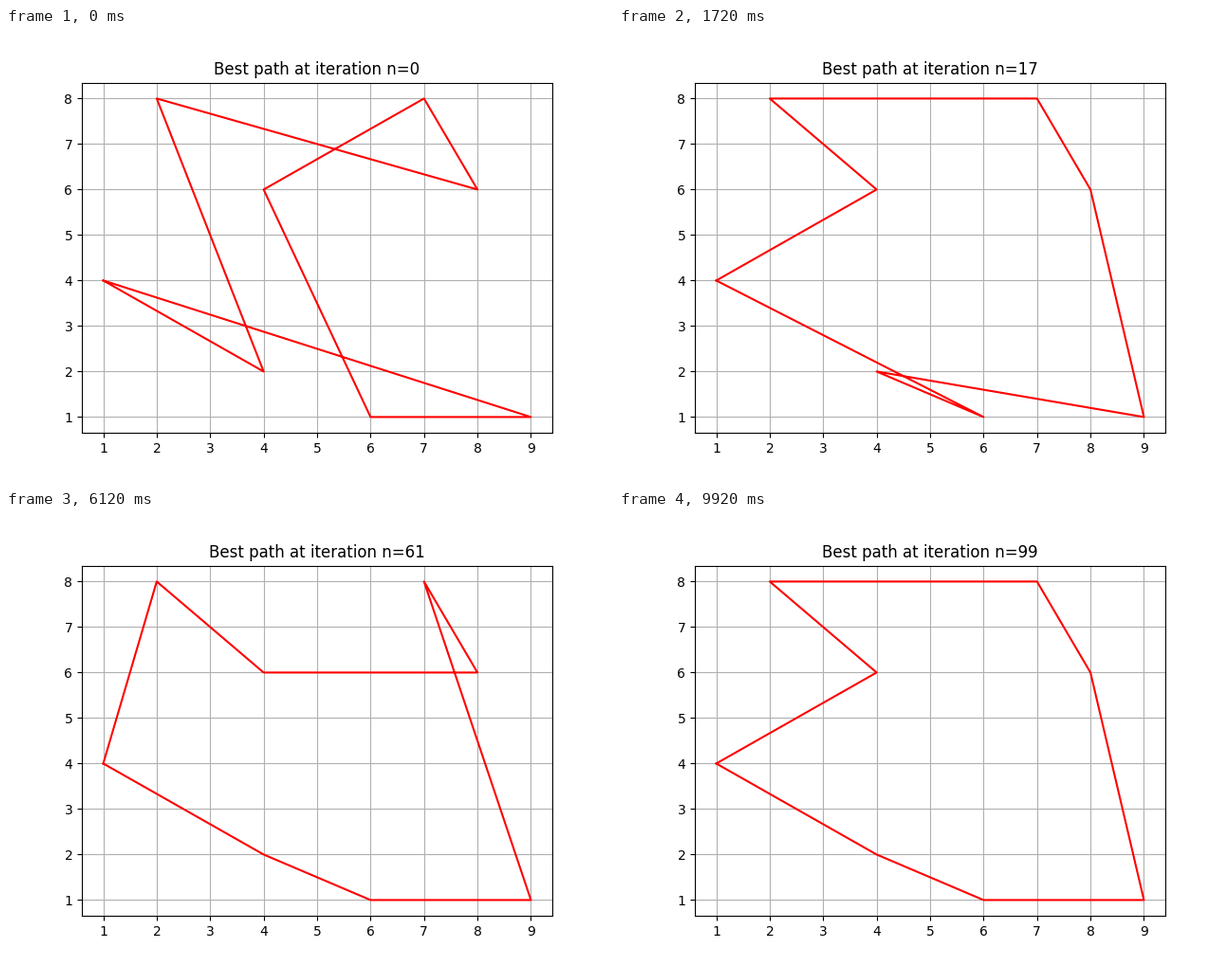
A matplotlib script for the animation above (10 s loop, 640 by 480 pixels).

```python
import matplotlib.pyplot as plt
from matplotlib.animation import FuncAnimation

CITIES = {
    "a": (1, 4), "b": (2, 8), "c": (4, 6), "d": (7, 8),
    "e": (8, 6), "f": (9, 1), "g": (6, 1), "h": (4, 2),
}

# First iteration at which each closed tour is the best one.
TOURS = [(0, "ahbedcgf"), (4, "abfghed"), (10, "acbdefhg"),
         (50, "ahgfdecb"), (94, "ahgfedbc")]

TICK = 40
TICKS = 250


def best_tour(n):
    return [tour for start, tour in TOURS if start <= n][-1]


def iteration(tick):
    # Iterations last 120 ms and 80 ms in turn.
    pair, rest = divmod(tick, 5)
    return 2 * pair + (rest >= 3)


fig, ax = plt.subplots(figsize=(6.4, 4.8), dpi=100)
line, = ax.plot([], [], color="red", lw=1.5)
ax.set_xlim(0.6, 9.4)
ax.set_ylim(0.65, 8.35)
ax.set_xticks(range(1, 10))
ax.set_yticks(range(1, 9))
ax.grid(True)
title = ax.set_title("")


def update(tick):
    n = iteration(tick)
    tour = best_tour(n)
    line.set_data(*zip(*(CITIES[c] for c in tour + tour[0])))
    title.set_text(f"Best path at iteration n={n}")
    return line, title


anim = FuncAnimation(fig, update, frames=TICKS, interval=TICK,
                     repeat=True, repeat_delay=0, blit=False)
plt.show()
```
